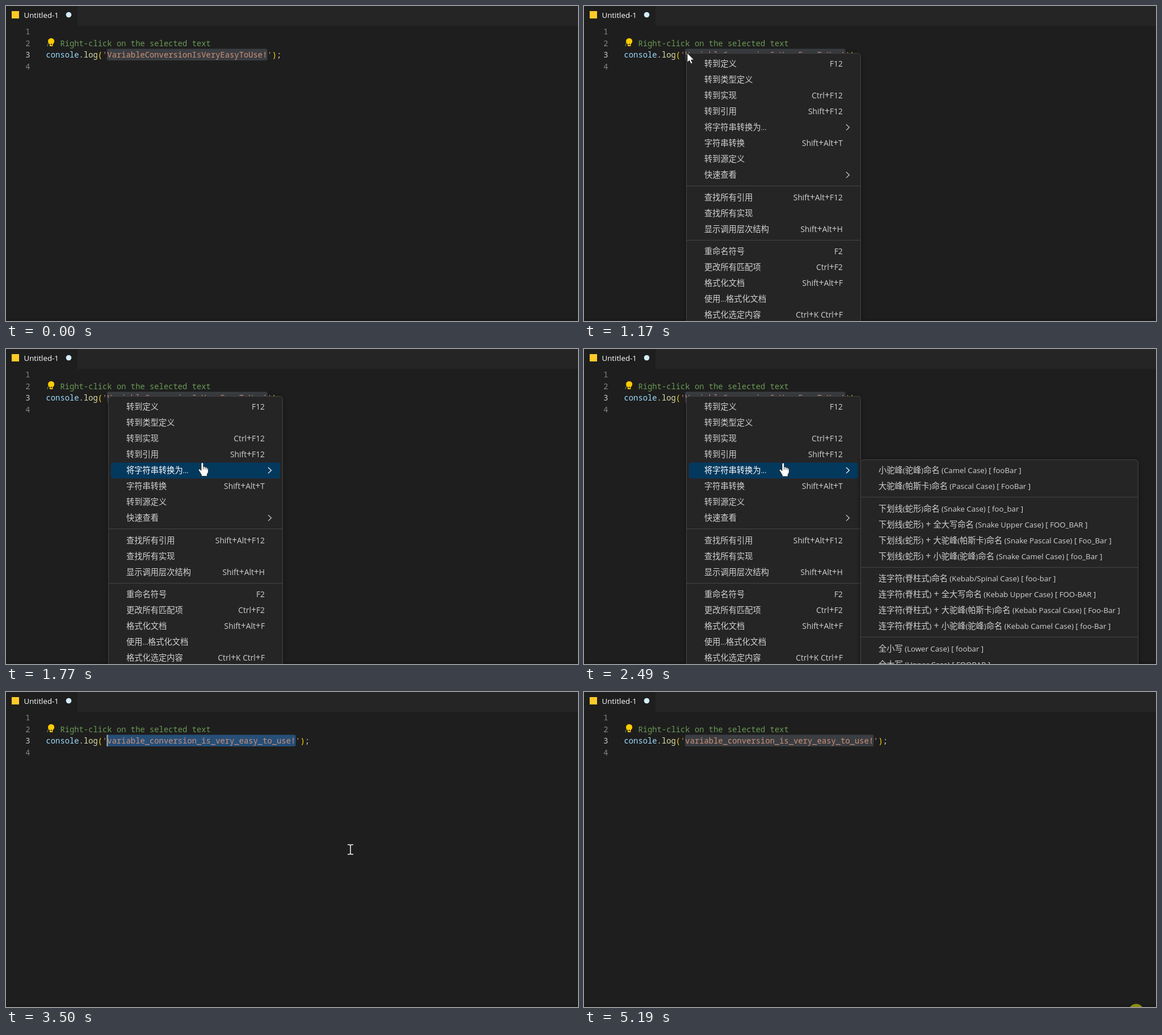
Recreate the animation shown at these times as an HTML page. Size 1008x556 px, loop 5260 ms.

```html
<!DOCTYPE html>
<html lang="zh-CN">
<head>
<meta charset="utf-8">
<title>Case conversion</title>
<style>
html, body { margin: 0; width: 100%; height: 100%; overflow: hidden; background: #1e1e1e; }
svg { display: block; }
text { white-space: pre; }
.code { font: 500 13.83px "Noto Sans Mono", monospace; }
.ui { font: 13.3px "Open Sans", "Noto Sans", sans-serif; }
.item { font: 14.25px "Noto Sans CJK SC", "Noto Sans CJK", sans-serif; fill: #d2d2d2; }
.latin, .key, .plus, .dots { font-family: "Open Sans", "Noto Sans", sans-serif; }
.latin { font-size: 13.25px; }
.key { font-size: 13.8px; }
.plus { font-size: 15.8px; }
.dots { font-size: 12px; }
.item path { fill: none; stroke: #ccc; stroke-width: 1.2; }
.item .bar { fill: none; }
.item.on { fill: #fff; }
.item.on .bar { fill: #04395e; }
.item.on path { stroke: #fff; }
.panel { fill: #252526; stroke: #454545; filter: drop-shadow(0 2px 4px rgba(0, 0, 0, .4)); }
.sep { stroke: #454545; }
</style>
</head>
<body>
<svg id="stage" width="1008" height="556" viewBox="0 0 1008 556">
  <rect width="1008" height="556" fill="#1e1e1e"/>
  <rect x="126" width="882" height="35" fill="#252526"/>
  <rect width="1" height="556" fill="#1a1a1a"/>
  <rect y="552" width="1008" height="4" fill="#1a1a1a"/>
  <rect x="10" y="9" width="13" height="13" fill="#ffca28"/>
  <text class="ui" x="31.5" y="21" fill="#fff">Untitled-1</text>
  <circle cx="110.5" cy="15.5" r="4.8" fill="#d4ecfa"/>
  <g id="gutter" class="code" text-anchor="end"></g>
  <rect id="selection" x="178" y="75.5" height="20.5" rx="3"/>
  <g class="code">
    <text x="70.5" y="70.5" fill="#6a9955">/  Right-click on the selected text</text>
    <text x="70.5" y="90.6" fill="#d4d4d4"><tspan fill="#9cdcfe">console</tspan>.<tspan fill="#dcdcaa">log</tspan><tspan fill="#ffd700">(</tspan><tspan id="string" fill="#ce9178"></tspan><tspan fill="#ffd700">)</tspan>;</text>
  </g>
  <rect id="caret" x="177.5" y="75.5" width="2" height="20.5" fill="#aeafad"/>
  <g id="bulb">
    <path d="M77 71V67.5Q74 65.6 74 62.3A5.6 5.6 0 0 1 85.2 62.3Q85.2 65.6 82.3 67.5V71Z" fill="#fc0"/>
    <rect x="78.7" y="66.7" width="2" height="2.4" fill="#1e1e1e"/>
  </g>
  <g id="menu"></g>
  <g id="submenu"></g>
  <circle id="click" r="13.5" fill="#ff0" fill-opacity=".5"/>
  <g id="beam">
    <path d="M-5 -8.5H-1.5L0 -7.5L1.5 -8.5H5M0 -7.5V7.5M-5 8.5H-1.5L0 7.5L1.5 8.5H5" fill="none" stroke="#f0f0f0" stroke-width="1.6"/>
  </g>
  <path id="arrow" d="M0 0V16.6L3.8 13L6.5 19L9.2 17.8L6.6 12H11.8Z" fill="#fff" stroke="#111" stroke-width=".8"/>
  <g id="hand" stroke="#111" stroke-width=".8" stroke-linejoin="round">
    <path d="M-2 2Q-2 0 -.1 0Q1.8 0 1.8 2V7.2Q4.8 6.5 5 8.2Q7.8 7.5 8.1 9.4Q10.4 9 10.4 11.5V16Q10.4 18 8.4 20.4V24H-1.6V21.5Q-3 19.5 -4.2 17L-6.6 13.5Q-7 11 -5 11.3Q-3.4 12 -2 14Z" fill="#fff"/>
    <path d="M1.8 7.2V12M5 8.2V12M8.1 9.4V12.5" fill="none"/>
  </g>
</svg>
<script>
const LOOP = 5260;
const NS = 'http://www.w3.org/2000/svg';
const $ = id => document.getElementById(id);

function add(parent, tag, attrs, content = '') {
  const el = document.createElementNS(NS, tag);
  for (const key in attrs) el.setAttribute(key, attrs[key]);
  el.textContent = content;
  return parent.appendChild(el);
}

// Each entry is "label|shortcut"; '>' means a submenu, '-' a separator.
const MENU = ['转到定义|F12', '转到类型定义', '转到实现|Ctrl+F12', '转到引用|Shift+F12',
  '将字符串转换为...|>', '字符串转换|Shift+Alt+T', '转到源定义', '快速查看|>', '-',
  '查找所有引用|Shift+Alt+F12', '查找所有实现', '显示调用层次结构|Shift+Alt+H', '-',
  '重命名符号|F2', '更改所有匹配项|Ctrl+F2', '格式化文档|Shift+Alt+F',
  '使用...格式化文档', '格式化选定内容|Ctrl+K Ctrl+F'];
const SUBMENU = ['小驼峰(驼峰)命名 (Camel Case) [ fooBar ]', '大驼峰(帕斯卡)命名 (Pascal Case) [ FooBar ]', '-',
  '下划线(蛇形)命名 (Snake Case) [ foo_bar ]',
  '下划线(蛇形) + 全大写命名 (Snake Upper Case) [ FOO_BAR ]',
  '下划线(蛇形) + 大驼峰(帕斯卡)命名 (Snake Pascal Case) [ Foo_Bar ]',
  '下划线(蛇形) + 小驼峰(驼峰)命名 (Snake Camel Case) [ foo_Bar ]', '-',
  '连字符(脊柱式)命名 (Kebab/Spinal Case) [ foo-bar ]',
  '连字符(脊柱式) + 全大写命名 (Kebab Upper Case) [ FOO-BAR ]',
  '连字符(脊柱式) + 大驼峰(帕斯卡)命名 (Kebab Pascal Case) [ Foo-Bar ]',
  '连字符(脊柱式) + 小驼峰(驼峰)命名 (Kebab Camel Case) [ foo-Bar ]', '-',
  '全小写 (Lower Case) [ foobar ]', '全大写 (Upper Case) [ FOOBAR ]'];

// Splits a label by script, so that each run gets its own font.
function addRuns(text, label, base) {
  for (const run of label.match(/[\u4e00-\u9fff]+| ?\+ ?|\.{3}|[^\u4e00-\u9fff+.]+?(?= ?\+|[\u4e00-\u9fff.]|$)/g)) {
    const style = run > '\u4e00' ? 'han' : run.includes('+') ? 'plus' : run === '...' ? 'dots' : base;
    add(text, 'tspan', { class: style }, run);
  }
}

function buildMenu(root, x, y, width, entries) {
  add(root, 'rect', { class: 'panel', x: x + .5, y: y + .5, width: width - 1, height: 620, rx: 5 });
  const rows = [];
  let top = y + 5;
  for (const entry of entries) {
    if (entry === '-') {
      const line = Math.floor(top + 5.5) + .5;
      add(root, 'line', { class: 'sep', x1: x + 1, x2: x + width - 1, y1: line, y2: line });
      top += 11.5;
      continue;
    }
    const [label, key] = entry.split('|');
    const el = add(root, 'g', { class: 'item' });
    add(el, 'rect', { class: 'bar', x: x + 5, y: top + .5, width: width - 10, height: 28, rx: 4 });
    addRuns(add(el, 'text', { x: x + 32, y: top + 19.2 }), label, 'latin');
    if (key === '>') add(el, 'path', { d: `M${x + 282} ${top + 9}l5.5 5.2l-5.5 5.2` });
    else if (key) addRuns(add(el, 'text', { x: x + 276, y: top + 19, 'text-anchor': 'end' }), key, 'key');
    rows.push({ el, top });
    top += 28;
  }
  return rows;
}

const mainRows = buildMenu($('menu'), 180, 83, 308, MENU);
const subRows = buildMenu($('submenu'), 487, 195, 490, SUBMENU);
for (let i = 0; i < 4; i++) {
  add($('gutter'), 'text', { x: 42.5, y: 50 + i * 20.5, fill: i === 2 ? '#c6c6c6' : '#858585' }, i + 1);
}

const smooth = p => p * p * (3 - 2 * p);
const slowDown = p => 1 - (1 - p) ** 1.8;

// start, end, steps, from x, y, to x, y, easing
const MOVES = [
  [60, 560, 8, 913, 531, 197, 97, slowDown],
  [630, 850, 4, 195, 95, 182, 83, slowDown],
  [1500, 1770, 5, 192, 91, 346, 200.5, smooth],
  [2490, 2980, 8, 351, 201, 603, 275, smooth],
  [3040, 3040, 1, 607, 278, 607, 278, smooth],
  [4230, 4710, 8, 612, 282, 943, 540, smooth],
  [4780, 4850, 2, 947, 544, 954, 551, smooth],
  [4990, 4990, 1, 973, 564, 973, 564, smooth]
];
const CLICKS = [[1040, 1170], [2030, 2160], [3310, 3440], [5120, LOOP]];

function pointer(t) {
  const move = MOVES.filter(m => m[0] <= t).pop();
  if (!move) return [973, 580];
  const [start, end, steps, x0, y0, x1, y1, ease] = move;
  const gaps = steps - 1;
  const step = gaps ? Math.min(gaps, Math.floor((t - start) / (end - start) * gaps + .05)) : 0;
  const p = gaps ? ease(step / gaps) : 1;
  return [x0 + (x1 - x0) * p, y0 + (y1 - y0) * p];
}

const within = (t, a, b) => t >= a && t < b;
const show = (id, on) => { $(id).style.display = on ? '' : 'none'; };
const hover = (rows, test) => rows.forEach((row, i) => row.el.classList.toggle('on', test(row, i)));

function draw(t) {
  const [x, y] = pointer(t);
  const shape = !within(t, 60, 4990) ? '' : within(t, 1170, 1500) ? 'arrow'
    : within(t, 1500, 3440) ? 'hand' : 'beam';
  for (const id of ['beam', 'arrow', 'hand']) show(id, id === shape);
  if (shape) $(shape).setAttribute('transform', `translate(${x.toFixed(1)} ${y.toFixed(1)})`);

  show('click', CLICKS.some(([a, b]) => within(t, a, b)));
  $('click').setAttribute('cx', x);
  $('click').setAttribute('cy', y);

  const over = row => y >= row.top && y < row.top + 28;
  show('menu', within(t, 1170, 3440));
  show('submenu', within(t, 2160, 3440));
  hover(mainRows, (row, i) => t >= 1770 ? i === 4 : t >= 1500 && over(row));
  hover(subRows, row => t >= 2490 && x > 491 && over(row));

  const word = t < 3500 ? 'VariableConversionIsVeryEasyToUse!' : 'variable_conversion_is_very_easy_to_use!';
  $('string').textContent = `'${word}'`;
  $('selection').setAttribute('width', word.length * 8.3 + .5);
  $('selection').setAttribute('fill', within(t, 3440, 5190) ? '#264f78' : '#3a3d41');
  show('caret', within(t, 3440, 3970) || within(t, 4470, 4990));
}

const origin = performance.now();
function tick() {
  draw((performance.now() - origin) % LOOP);
  requestAnimationFrame(tick);
}
tick();
</script>
</body>
</html>
```
